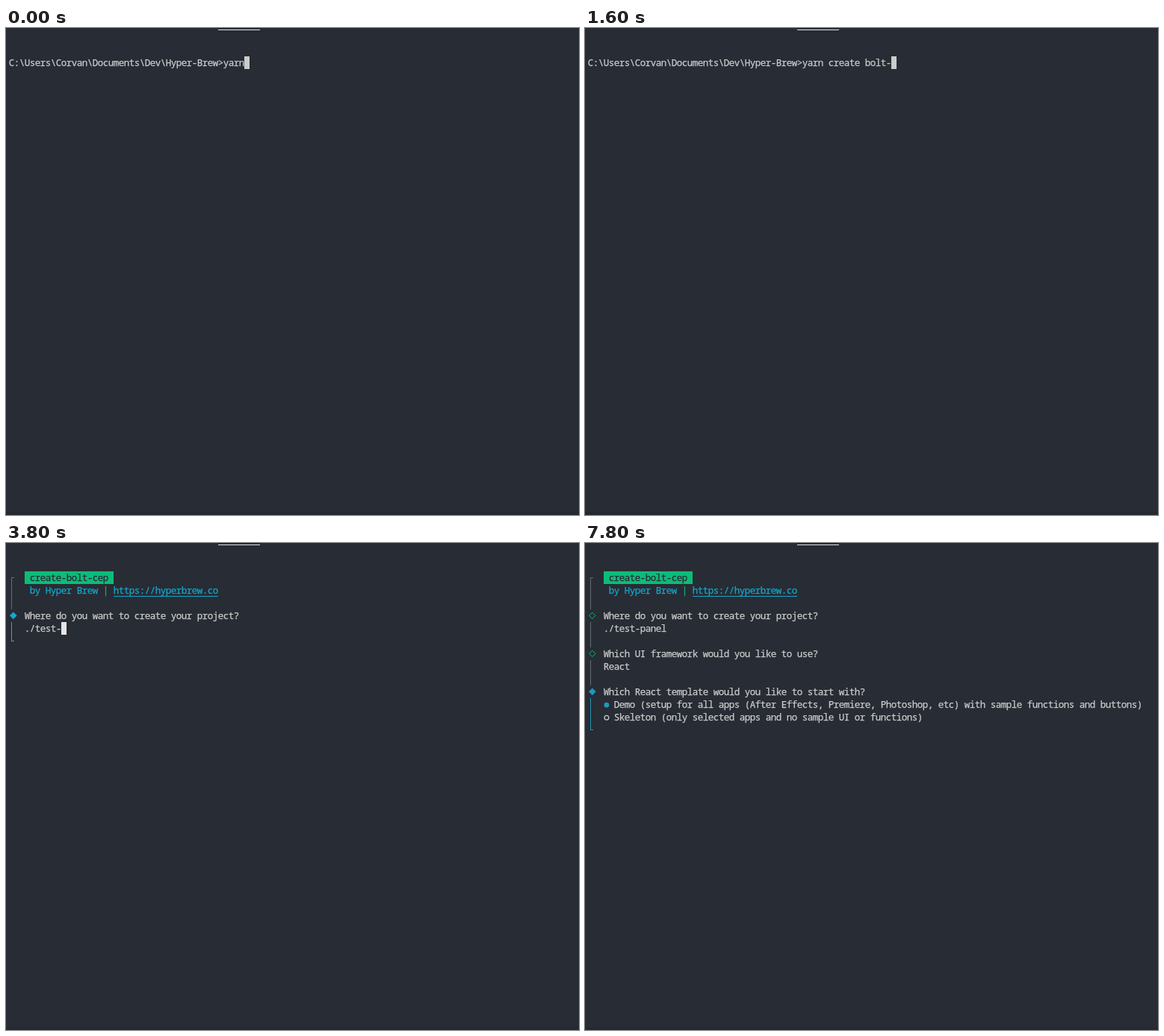
An HTML page that plays this animation: 767x653 px, repeating every 8 s.

```html
<!DOCTYPE html>
<html lang="en">
<head>
<meta charset="utf-8">
<title>Terminal session</title>
<style>
  html, body { margin: 0; width: 100%; height: 100%; overflow: hidden; background: #282c34; }
  svg { display: block; }
  text {
    font: 12.5px "Noto Sans Mono", monospace;
    letter-spacing: -0.5px; /* 7.5px advance on a 7px cell grid */
    font-variant-ligatures: none;
    white-space: pre;
    stroke-width: 0.25px;
  }
</style>
</head>
<body>
<svg width="767" height="653" viewBox="0 0 767 653">
  <rect width="767" height="653" fill="#282c34"/>
  <rect y="649" width="767" height="4" fill="#252930"/>
  <rect x="284" y="2" width="56" height="1" fill="#e5e5e5"/>
  <g id="screen"></g>
</svg>
<script>
const LOOP = 8000, CELL = 7, ROW = 17, LEFT = 4, TOP = 38;
const FG = '#cccccc', GREEN = '#0dbc79', CYAN = '#11a8cd', BLUE = '#2196ba', GRAY = '#666a72';

const PROMPT = String.raw`C:\Users\Corvan\Documents\Dev\Hyper-Brew>`;
const COMMAND = 'yarn create bolt-cep';
const FOLDER = './test-panel';

// Moments at which one more character appears.
const commandKeys = [60, 320, 500, 570, 640, 710, 780, 1010, 1110, 1210,
  1370, 1450, 1600, 1750, 1825, 1900];
const folderKeys = [3330, 3400, 3470, 3540, 3800, 3990, 4090, 4190, 4290, 4390];
const ENTER = 2190, ASK_FOLDER = 2210, ASK_FRAMEWORK = 4630, PICK_REACT = 6370, ASK_TEMPLATE = 7800;

const colX = col => LEFT + col * CELL;
const rowY = row => TOP + row * ROW;
const typed = (text, start, keys, t) => text.slice(0, start + keys.filter(k => k <= t).length);

const rect = (x, y, w, h, fill) =>
  `<rect x="${x}" y="${y}" width="${w}" height="${h}" fill="${fill}"/>`;
const text = (col, row, str, color = FG) =>
  `<text x="${colX(col) - 0.25}" y="${rowY(row) + 13}" fill="${color}" stroke="${color}">${str}</text>`;
const cursor = (col, row, fill = FG) => rect(colX(col), rowY(row), CELL, ROW, fill);

const bar = (row, rows, color) => rect(7, rowY(row), 1, rows * ROW, color);
const corner = (row, color, isTop) =>
  rect(7, rowY(row) + (isTop ? 8 : 0), 1, 9, color) + rect(8, rowY(row) + 8, 3, 1, color);

function diamond(row, color, filled) {
  const r = filled ? 4.9 : 4.2, y = rowY(row) + 8.3;
  return `<path d="M${9.8 - r} ${y}l${r} ${-r} ${r} ${r} ${-r} ${r}z" ` +
    (filled ? `fill="${color}"/>` : `fill="none" stroke="${color}"/>`);
}

function option(row, label, color) {
  const shape = color
    ? `r="3.4" fill="${color}"`
    : `r="2.9" fill="none" stroke="${FG}" stroke-width="1.2"`;
  return `<circle cx="28.9" cy="${rowY(row) + 9.2}" ${shape}/>` + text(5, row, label);
}

const question = (row, str, color, active) => diamond(row, color, active) + text(3, row, str);

function shell(t) {
  const line = PROMPT + typed(COMMAND, 4, commandKeys, t);
  return text(0, 0, line) + (t < ENTER ? cursor(line.length, 0) : cursor(0, 1));
}

const banner = () =>
  corner(0, GRAY, true) + bar(1, 2, GRAY) +
  rect(colX(3), rowY(0), 17 * CELL, ROW, GREEN) +
  text(4, 0, 'create-bolt-cep', '#282c34') +
  text(4, 1, 'by Hyper Brew', CYAN) + text(18, 1, '|', GREEN) +
  text(20, 1, 'https://hyperbrew.co', CYAN) +
  rect(colX(20), rowY(1) + 16, 20 * CELL, 1, CYAN);

function folderStep(t) {
  const active = t < ASK_FRAMEWORK;
  const value = typed(FOLDER, 2, folderKeys, t);
  const head = question(3, 'Where do you want to create your project?', active ? CYAN : GREEN, active) +
    text(3, 4, value);
  return head + (active
    ? bar(4, 1, '#7f8b92') + corner(5, '#7f8b92') + cursor(3 + value.length, 4, '#e5e5e5')
    : bar(4, 2, GRAY));
}

function frameworkStep(t) {
  const active = t < ASK_TEMPLATE;
  const head = question(6, 'Which UI framework would you like to use?', active ? BLUE : GREEN, active);
  if (!active) return head + bar(7, 2, GRAY) + text(3, 7, 'React');
  const react = t >= PICK_REACT;
  return head + bar(7, 3, BLUE) + corner(10, BLUE) +
    option(7, 'Svelte', !react && GREEN) +
    option(8, 'React', react && '#1a8570') +
    option(9, 'Vue');
}

const templateStep = () =>
  question(9, 'Which React template would you like to start with?', BLUE, true) +
  bar(10, 2, BLUE) + corner(12, BLUE) +
  option(10, 'Demo (setup for all apps (After Effects, Premiere, Photoshop, etc) with sample functions and buttons)', BLUE) +
  option(11, 'Skeleton (only selected apps and no sample UI or functions)');

function scene(t) {
  if (t < ASK_FOLDER) return shell(t);
  return banner() + folderStep(t) +
    (t >= ASK_FRAMEWORK ? frameworkStep(t) : '') +
    (t >= ASK_TEMPLATE ? templateStep() : '');
}

const screenGroup = document.getElementById('screen');
let shown = '';
function draw() {
  const markup = scene(performance.now() % LOOP);
  if (markup !== shown) screenGroup.innerHTML = shown = markup;
  requestAnimationFrame(draw);
}
draw();
</script>
</body>
</html>
```
